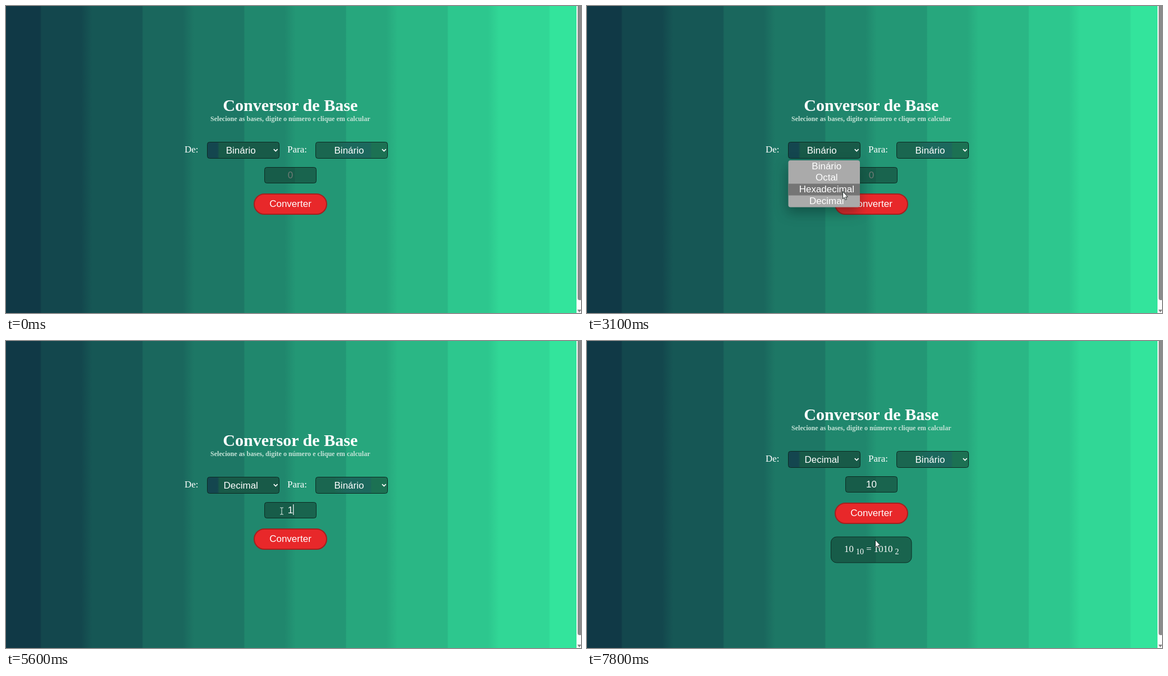
These frames come from a looping animation (1024 px wide and 547 px high, 8000 ms). An HTML page:

```html
<!DOCTYPE html>
<html lang="pt-BR">
<head>
<meta charset="utf-8">
<title>Conversor de Base</title>
<style>
  html, body { margin: 0; width: 100%; height: 100%; overflow: hidden; background: #2b9a78; }
  svg { display: block; width: 100%; height: 100%; }
  text { fill: #fff; }
  .serif { font-family: "Liberation Serif", "Times New Roman", serif; font-size: 17px; }
  .sans { font-family: "Liberation Sans", Arial, sans-serif; font-size: 17px; }
  .ui { font-family: "Open Sans", "Noto Sans", sans-serif; }
  .mid { text-anchor: middle; }
  .field { stroke: #0c2a22; stroke-width: 1; }
  #list { filter: drop-shadow(-2px 10px 11px rgba(0, 30, 25, .38)); }
  #stored { filter: drop-shadow(1px 6px 5px rgba(0, 30, 25, .35)); }
</style>
</head>
<body>
<svg viewBox="0 0 1024 547" preserveAspectRatio="none">
  <defs>
    <linearGradient id="bands" gradientUnits="userSpaceOnUse" x1="0" x2="1016" y1="0" y2="0"></linearGradient>
    <linearGradient id="fromFill">
      <stop offset=".14" stop-color="#14464f"/><stop offset=".17" stop-color="#185a48"/>
    </linearGradient>
    <linearGradient id="toFill">
      <stop offset=".25" stop-color="#1a6650"/><stop offset=".45" stop-color="#1c685d"/>
      <stop offset=".76" stop-color="#1c685d"/><stop offset=".78" stop-color="#1c7153"/>
    </linearGradient>
    <linearGradient id="boxFill" gradientUnits="userSpaceOnUse" x1="434" x2="579" y1="0" y2="0">
      <stop offset=".55" stop-color="#175c49"/><stop offset=".56" stop-color="#19644e"/>
    </linearGradient>
    <clipPath id="listClip"><rect x="358.5" y="275" width="127.5" height="83.5" rx="4"/></clipPath>
    <path id="chevron" d="M-3.4-1.7L0 1.7l3.4-3.4" fill="none" stroke="#fff" stroke-width="1.7"/>
  </defs>

  <rect width="1016" height="547" fill="url(#bands)"/>
  <rect x="1016" width="8" height="547" fill="#fcfcfc"/>
  <rect x="1018" y="-8" width="8" height="532" rx="3.5" fill="#8b8b8b"/>
  <path d="M1017.5 541h7l-3.5 5z" fill="#858585"/>

  <g id="page">
    <text class="serif mid" x="506.3" y="187" style="font-size:30.1px;font-weight:700">Conversor de Base</text>
    <text class="serif mid" x="506.3" y="205.2" style="font-size:12.1px;font-weight:700;fill:#c3e2d6">Selecione as bases, digite o número e clique em calcular</text>

    <text class="serif" x="318" y="261">De:</text>
    <rect class="field" x="358.5" y="242.5" width="128" height="29" rx="4" fill="url(#fromFill)"/>
    <text class="sans mid" id="from" x="418.2" y="262.5"></text>
    <use href="#chevron" x="480.2" y="256.9"/>

    <text class="serif" x="501" y="261">Para:</text>
    <rect class="field" x="551.5" y="242.5" width="128" height="29" rx="4" fill="url(#toFill)"/>
    <text class="sans mid" x="611" y="262.5">Binário</text>
    <use href="#chevron" x="673.2" y="256.9"/>

    <rect class="field" x="460.5" y="287.5" width="92" height="28" rx="4" fill="url(#boxFill)"/>
    <text class="sans mid" id="number" x="506.5" y="306.5"></text>
    <rect id="caret" y="291" width="1.2" height="19" fill="#fff"/>

    <rect id="button" x="442" y="335" width="129" height="36" rx="18" stroke="#a3201f" stroke-width="2"/>
    <text class="sans mid" x="506.5" y="358.4">Converter</text>
  </g>

  <g id="result">
    <rect class="field" x="434.5" y="349" width="143.5" height="46" rx="10" fill="url(#boxFill)"/>
    <text class="serif" x="458" y="376" style="font-size:16.8px">10 <tspan dy="4" font-size="14">10</tspan><tspan dy="-4"> = 1010 </tspan><tspan dy="4" font-size="14">2</tspan></text>
  </g>

  <g id="list">
    <rect x="358.5" y="275" width="127.5" height="83.5" rx="4" fill="#aaa"/>
    <rect id="hover" x="358" width="129" height="20.9" fill="#757575" clip-path="url(#listClip)"/>
  </g>

  <g id="stored">
    <rect x="459.5" y="315.5" width="242" height="55.5" rx="2.5" fill="#4a4a48"/>
    <text class="ui" x="471" y="332" style="font-size:7.85px;fill:#c4c4c4">Dados armazenados</text>
    <path d="M686.6 325.6l6.6 6.6m0-6.6l-6.6 6.6" stroke="#e4e4e4"/>
    <text class="ui" x="469.7" y="358.3" style="font-size:8.8px">284</text>
  </g>

  <g id="pointer">
    <path id="arrow" d="M.5.5V13.6L3.4 11 5.3 15.4 7.4 14.5 5.5 10.2H9.4z" fill="#fff" stroke="#0b1714" stroke-width=".9"/>
    <path id="beam" d="M-3-6h2l1 1 1-1h2M-3 6h2l1-1 1 1h2M0-5V5" fill="none" stroke="#d5e6df" stroke-width="1.1"/>
  </g>
</svg>

<script>
  const LOOP = 8000, STEP = 100, BLINK = 500;
  const when = {
    enter: 200, openList: 2400, pick: 3500, focus: 4100, toArrow: 5100,
    firstDigit: 5500, secondDigit: 5900, pointerBack: 6100, submit: 7800
  };

  const $ = id => document.getElementById(id);
  const show = (id, on) => { $(id).style.display = on ? "" : "none"; };
  const between = (v, a, b) => v >= a && v < b;
  const clamp = (v, lo, hi) => Math.min(hi, Math.max(lo, v));
  const svgNode = (parent, tag, attrs) => {
    const node = document.createElementNS("http://www.w3.org/2000/svg", tag);
    for (const key in attrs) node.setAttribute(key, attrs[key]);
    return parent.appendChild(node);
  };

  // Background: a gradient in equal flat bands; every other boundary is blurred.
  const WIDTH = 1016, BAND = 90.6, FIRST_EDGE = 62, BLUR = 19;
  const dark = [15, 52, 67], light = [52, 232, 158];
  const shade = x => `rgb(${dark.map((c, i) => Math.round(c + (light[i] - c) * x / WIDTH))})`;
  for (let k = 0, left = 0; left < WIDTH; k++) {
    const right = Math.min(WIDTH, FIRST_EDGE + k * BAND);
    const color = shade((left + right) / 2);
    for (const x of [left + 1, right - (k % 2 ? BLUR : 1)])
      svgNode($("bands"), "stop", { offset: x / WIDTH, "stop-color": color });
    left = right;
  }

  const ROW = 20.8, LIST_TOP = 275;
  ["Binário", "Octal", "Hexadecimal", "Decimal"].forEach((name, i) => {
    const label = svgNode($("list"), "text", { class: "sans mid", x: 426.8, y: LIST_TOP + 15.5 + i * ROW });
    label.textContent = name;
  });

  // Pointer moves; between them it rests.
  const moves = [
    { from: 200, to: 1000, x: 438, y: 255 },
    { from: 1000, to: 1200, x: 486, y: 263 },
    { from: 1300, to: 2200, x: 476, y: 256 },
    { from: 2500, to: 3200, x: 452, y: 342 },
    { from: 3500, to: 3900, x: 496, y: 304 },
    { from: 5000, to: 5100, x: 491, y: 303 },
    { from: 6000, to: 6600, x: 664, y: 266 },
    { from: 6600, to: 6900, x: 593, y: 299 },
    { from: 6900, to: 7000, x: 532, y: 338 },
    { from: 7100, to: 7300, x: 513, y: 354 }
  ];
  function pointerAt(t) {
    let x = 17, y = 0;
    for (const move of moves) {
      const k = clamp((t - move.from) / (move.to - move.from), 0, 1);
      x += (move.x - x) * k;
      y += (move.y - y) * k;
    }
    return [Math.round(x), Math.round(y)];
  }

  function draw(t) {
    const [x, y] = pointerAt(t);
    const typed = t < when.firstDigit ? "" : t < when.secondDigit ? "1" : "10";
    const listOpen = between(t, when.openList, when.pick);
    const done = t >= when.submit;
    const lift = done ? 46 : 0;

    $("page").setAttribute("transform", `translate(0 ${-lift})`);
    $("from").textContent = t < when.pick ? "Binário" : "Decimal";
    $("number").textContent = typed || "0";
    $("number").style.fill = typed ? "#fff" : "#6f7b75";
    show("result", done);

    const overButton = !listOpen && between(x, 442, 571) && between(y + lift, 335, 371);
    $("button").setAttribute("fill", overButton ? "#d62424" : "#e8282a");

    const lastInput = [when.secondDigit, when.firstDigit, when.focus].find(time => t >= time);
    show("caret", lastInput && !done && Math.floor((t - lastInput) / BLINK) % 2 === 0);
    $("caret").setAttribute("x", 506.5 + typed.length * 4.75);

    show("list", listOpen);
    const row = clamp(Math.floor((y - LIST_TOP) / ROW), 0, 3);
    $("hover").setAttribute("y", LIST_TOP + row * ROW);
    show("stored", between(t, when.focus, when.firstDigit));

    const overInput = between(x, 461, 552) && between(y, 288, 315);
    const beam = overInput && !listOpen && !between(t, when.toArrow, when.firstDigit);
    show("pointer", t >= when.enter && !between(t, when.secondDigit, when.pointerBack));
    show("beam", beam);
    show("arrow", !beam);
    $("pointer").setAttribute("transform", `translate(${x} ${y})`);
  }

  function tick() {
    draw(Math.floor(performance.now() % LOOP / STEP) * STEP);
    requestAnimationFrame(tick);
  }
  tick();
</script>
</body>
</html>
```
